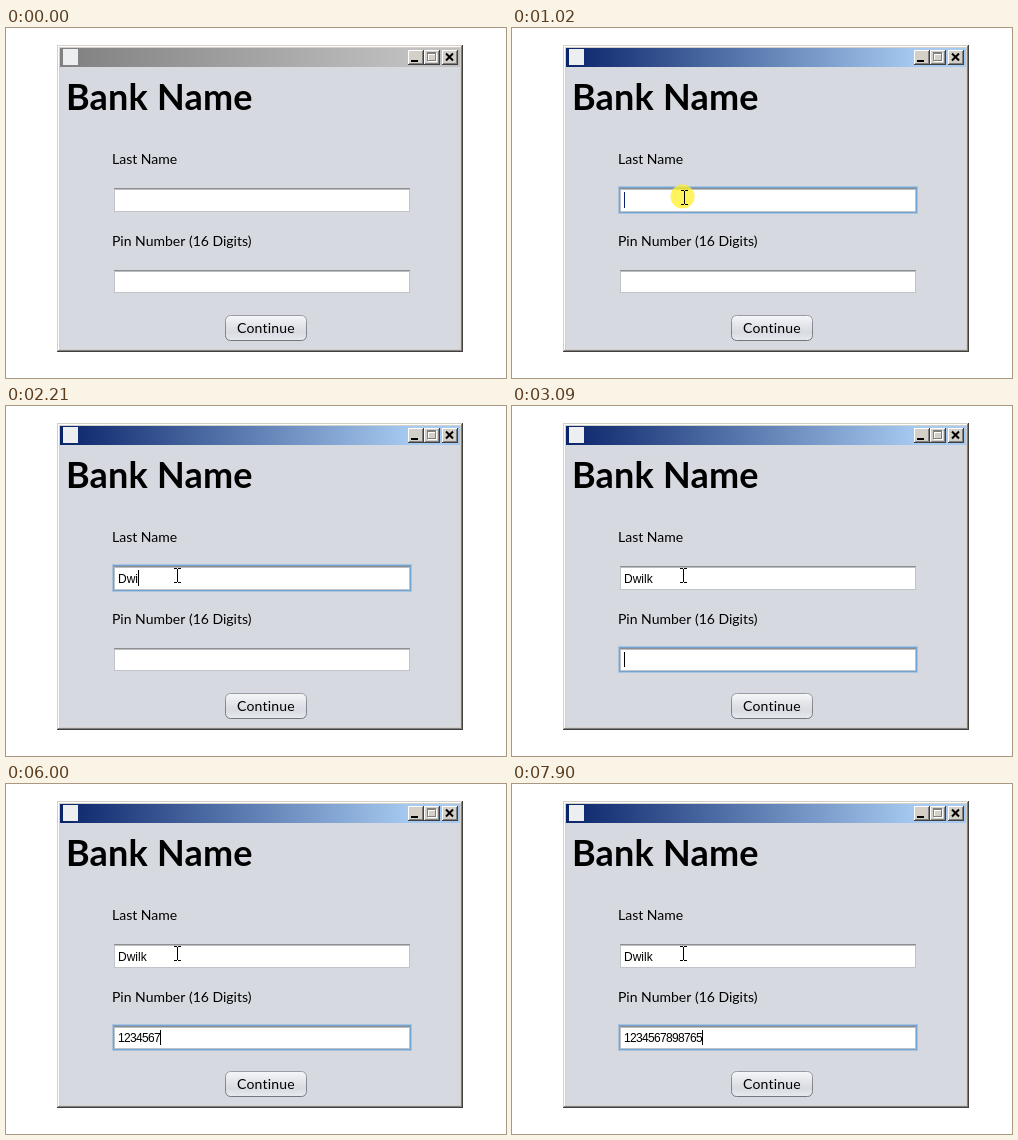
Write an HTML page with a canvas that moves like this. It is 500 px wide and 350 px high and loops after 8000 ms.

```html
<!DOCTYPE html>
<html lang="en">
<head>
<meta charset="utf-8">
<title>Login form</title>
<style>
html, body { margin: 0; width: 100%; height: 100%; overflow: hidden; background: #fff; }
canvas { display: block; }
</style>
</head>
<body>
<canvas id="stage" width="500" height="350"></canvas>
<script>
const ctx = document.getElementById('stage').getContext('2d');
const LOOP = 8000;
const LABEL = '14px Lato, "Open Sans", sans-serif';
const INPUT = '12px "Liberation Sans", Arial, sans-serif';
const NAME = 'Dwilk';
const PIN = '1234567898765';
const NAME_KEYS = [1810, 2010, 2210, 2410, 2480];
const PIN_KEYS = [3940, 4200, 4470, 5070, 5400, 5600, 6000, 6260, 6520, 6850, 7110, 7570, 7900];

const between = (t, a, b) => t >= a && t < b;
const typed = (text, keys, t) => text.slice(0, keys.filter(k => t >= k).length);

function rect(x, y, w, h, color) {
  ctx.fillStyle = color;
  ctx.fillRect(x, y, w, h);
}

function frame(x, y, w, h, light, dark) {
  rect(x, y, w, 1, light);
  rect(x, y, 1, h, light);
  rect(x, y + h - 1, w, 1, dark);
  rect(x + w - 1, y, 1, h, dark);
}

function text(str, x, y, font, spacing = 0) {
  ctx.font = font;
  ctx.letterSpacing = spacing + 'px';
  ctx.fillStyle = '#000';
  ctx.fillText(str, x, y);
  return ctx.measureText(str).width;
}

function gradient(x0, y0, x1, y1, ...colors) {
  const g = ctx.createLinearGradient(x0, y0, x1, y1);
  colors.forEach((c, i) => g.addColorStop(i / (colors.length - 1), c));
  return g;
}

function caption(x, w) {
  rect(x, 22, w, 15, '#d4d0c8');
  frame(x, 22, w, 15, '#fff', '#404040');
  frame(x + 1, 23, w - 2, 13, '#d4d0c8', '#808080');
}

function maximizeGlyph(x, y, color) {
  frame(x, y, 9, 9, color, color);
  rect(x, y + 1, 9, 1, color);
}

function drawWindow(active) {
  rect(51, 17, 406, 307, '#d4d0c8');
  frame(51, 17, 406, 307, '#d4d0c8', '#404040');
  frame(52, 18, 404, 305, '#fff', '#808080');
  rect(54, 39, 400, 282, '#d6d9df');
  const colors = active ? ['#0a246a', '#a6caf0'] : ['#808080', '#c0c0c0'];
  rect(54, 20, 400, 19, gradient(54, 0, 405, 0, ...colors));
  rect(57, 21, 15, 16, '#eceef0');

  caption(402, 16);
  rect(405, 32, 7, 2, '#000');
  caption(418, 16);
  maximizeGlyph(422, 25, '#fff');
  maximizeGlyph(421, 24, '#808080');
  caption(436, 16);
  ctx.strokeStyle = '#000';
  ctx.lineWidth = 2;
  ctx.beginPath();
  ctx.moveTo(440, 25.5); ctx.lineTo(447, 32.5);
  ctx.moveTo(447, 25.5); ctx.lineTo(440, 32.5);
  ctx.stroke();
}

function drawField(y, h, focused) {
  if (focused) {
    rect(106, y - 2, 300, h + 4, '#a9c4de');
    rect(107, y - 1, 298, h + 2, '#73a4d1');
  }
  rect(108, y, 296, h, '#c0c3c9');
  rect(108, y, 296, 1, '#8d8e92');
  rect(109, y + 1, 294, h - 2, '#fff');
  rect(109, y + 1, 294, 1, '#bcbdc0');
}

function drawButton() {
  ctx.beginPath();
  ctx.roundRect(219.5, 287.5, 81, 25, 5);
  ctx.fillStyle = gradient(0, 287, 0, 313, '#f8f8fa', '#e6e8ec', '#d8dbe1', '#e8ebf0');
  ctx.fill();
  ctx.lineWidth = 1;
  ctx.strokeStyle = gradient(0, 287, 0, 313, '#9a9da5', '#73767e');
  ctx.stroke();
  text('Continue', 231, 305, LABEL, 0.2);
}

function iBeam(x, y) {
  rect(x, y - 6, 1, 13, '#000');
  for (const dy of [-7, 7]) {
    rect(x - 3, y + dy, 3, 1, '#000');
    rect(x + 1, y + dy, 3, 1, '#000');
  }
}

function arrow(x, y) {
  const points = [[0, 0], [0, 16], [4, 12.5], [7, 19], [9.5, 18], [6.7, 11.5], [11.5, 11.5]];
  ctx.beginPath();
  points.forEach(([dx, dy]) => ctx.lineTo(x + dx + 0.5, y + dy + 0.5));
  ctx.closePath();
  ctx.fillStyle = '#fff';
  ctx.fill();
  ctx.lineWidth = 1;
  ctx.strokeStyle = '#000';
  ctx.stroke();
}

function drawPointer(t) {
  if (t < 130) return;
  const p = Math.min(1, Math.floor((t - 130) / 70) / 7);
  const ease = p * p * (3 - 2 * p);
  const x = Math.round(463 + (172 - 463) * ease) - (t >= 1160 ? 1 : 0);
  const y = Math.round(336 + (169 - 336) * ease);
  const overField = between(x, 108, 404) && (between(y, 160, 184) || between(y, 242, 265));
  (overField ? iBeam : arrow)(x, y);
}

function draw(t) {
  const active = t >= 1020;
  const onName = between(t, 1020, 3010);
  const onPin = t >= 3010;

  rect(0, 0, 500, 350, '#fff');
  drawWindow(active);
  text('Bank Name', 60, 82, '700 36px Lato, "Open Sans", sans-serif', 0.2);
  text('Last Name', 106, 136, LABEL);
  text('Pin Number (16 Digits)', 106, 218, LABEL);
  drawField(160, 24, onName);
  drawField(242, 23, onPin);
  drawButton();

  const nameWidth = text(typed(NAME, NAME_KEYS, t), 112, 177, INPUT);
  const digits = typed(PIN, PIN_KEYS, t);
  text(digits, 112, 258, INPUT, -0.67);

  if (between(t, 1020, 1290)) {
    ctx.beginPath();
    ctx.arc(170.5, 168.5, 12, 0, Math.PI * 2);
    ctx.fillStyle = 'rgba(255, 240, 40, 0.75)';
    ctx.fill();
  }
  if (onName && !between(t, 1550, 1810)) {
    rect(112 + Math.round(nameWidth), 164, 1, 16, t < 1290 ? '#0a246a' : '#000');
  }
  if (t >= 3090 && !between(t, 3540, 3940) && !between(t, 5000, 5070)) {
    rect(112 + digits.length * 6, 246, 1, 15, '#000');
  }
  drawPointer(t);
}

function tick(now) {
  draw(now % LOOP);
  requestAnimationFrame(tick);
}
requestAnimationFrame(tick);
</script>
</body>
</html>
```
